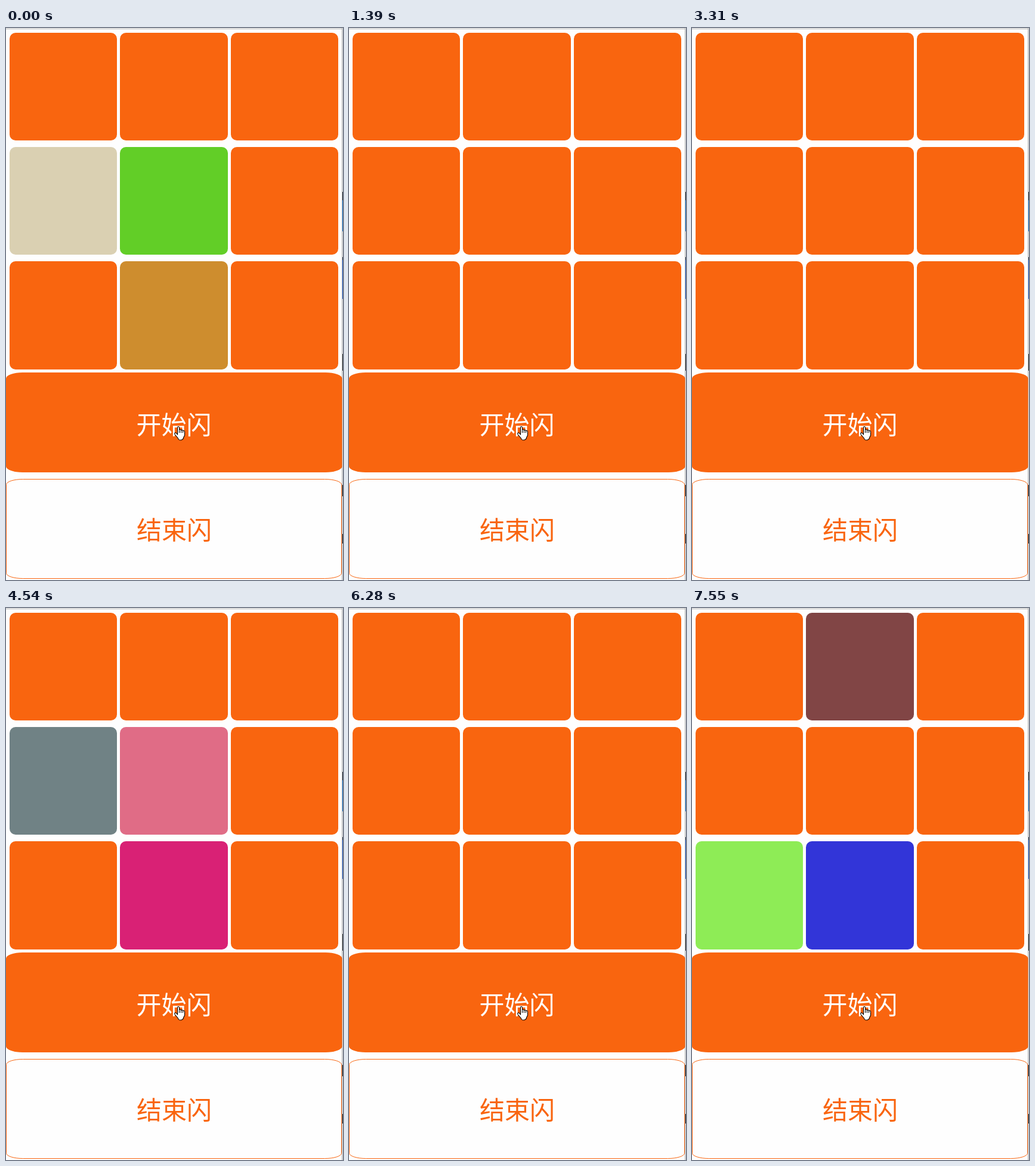
Write an HTML page with a canvas that moves like this. It is 565 px wide and 923 px high and loops after 8 s.

```html
<!DOCTYPE html>
<html lang="zh">
<head>
<meta charset="utf-8">
<style>
  html, body { margin: 0; width: 100%; height: 100%; overflow: hidden; background: #fefefe; }
  canvas { display: block; }
</style>
</head>
<body>
<canvas id="stage" width="565" height="923"></canvas>
<script>
const ctx = document.getElementById('stage').getContext('2d');
const LOOP = 8000;
const ORANGE = '#f9650f';
const PAPER = '#fefefe';

// Column and row spans of the grid: [start, size]
const COLS = [[6, 180], [191, 181], [377, 180]];
const ROWS = [[8, 180], [199, 180], [390, 181]];

// Each flash lights three cells between two moments
const FLASHES = [
  { from: 0,    to: 280,  cells: { 3: '#dad0b2', 4: '#62ce27', 7: '#ce8d2e' } },
  { from: 580,  to: 1390, cells: { 3: '#b9773f', 5: '#5f9fb0', 7: '#a65cc0' } },
  { from: 1510, to: 2320, cells: { 0: '#7fae5a', 5: '#c2586f', 7: '#5b7bc4' } },
  { from: 2470, to: 3310, cells: { 2: '#bf9a63', 3: '#6a5fb5', 7: '#58b08a' } },
  { from: 3590, to: 4270, cells: { 1: '#9c7fc0', 3: '#6fb04e', 7: '#b8685a' } },
  { from: 4540, to: 5320, cells: { 3: '#708285', 4: '#e06c86', 7: '#d92175' } },
  { from: 5440, to: 6280, cells: { 0: '#a8a64f', 4: '#568fba', 7: '#b06a96' } },
  { from: 6430, to: 7270, cells: { 1: '#63a99a', 5: '#b5618a', 7: '#94a35a' } },
  { from: 7550, to: LOOP, cells: { 1: '#814545', 6: '#8eec56', 7: '#3235d8' } }
];

// Slivers of the desktop visible past the window: [top, bottom, colour]
const SLIVERS = [
  [274, 288, '#15202c'], [288, 340, '#0f6fc8'], [383, 388, '#26384c'],
  [388, 453, '#1c58c4'], [545, 573, '#20262a'],
  [764, 783, '#000'], [846, 862, '#000']
];

function rect(x, y, w, h, color) {
  ctx.fillStyle = color;
  ctx.fillRect(x, y, w, h);
}

function roundedPath(x, y, w, h, rx, ry = rx) {
  ctx.beginPath();
  ctx.roundRect(x, y, w, h, { x: rx, y: ry });
}

function label(text, cx, cy, color) {
  ctx.font = '42px "Noto Sans CJK SC", "Noto Sans CJK", sans-serif';
  const m = ctx.measureText(text);
  const x = cx + (m.actualBoundingBoxLeft - m.actualBoundingBoxRight) / 2;
  const y = cy + (m.actualBoundingBoxAscent - m.actualBoundingBoxDescent) / 2;
  ctx.fillStyle = color;
  ctx.fillText(text, x, y);
}

function drawWindow() {
  rect(0, 0, 565, 923, PAPER);
  rect(0, 1, 564, 1, '#b4b4b4');
  rect(563, 0, 1, 923, '#b0b0b0');
  rect(564, 0, 1, 923, '#dde0e4');
  for (const [top, bottom, color] of SLIVERS) rect(564, top, 1, bottom - top, color);
}

function drawGrid(time) {
  const flash = FLASHES.find(f => time >= f.from && time < f.to);
  for (let i = 0; i < 9; i++) {
    const [x, w] = COLS[i % 3];
    const [y, h] = ROWS[Math.floor(i / 3)];
    ctx.fillStyle = flash?.cells[i] ?? ORANGE;
    roundedPath(x, y, w, h, 10);
    ctx.fill();
  }
}

function drawButtons() {
  ctx.fillStyle = ORANGE;
  roundedPath(0, 576, 563.5, 167, 28, 10);
  ctx.fill();
  label('开始闪', 281, 663, '#fff');

  ctx.strokeStyle = ORANGE;
  ctx.lineWidth = 1;
  roundedPath(0.5, 754.5, 562, 166, 28, 9);
  ctx.stroke();
  label('结束闪', 281, 839, ORANGE);
}

function drawHand() {
  ctx.save();
  ctx.translate(282, 666);
  ctx.lineJoin = 'round';
  ctx.lineWidth = 1.1;
  ctx.strokeStyle = '#000';
  ctx.fillStyle = '#fff';
  ctx.stroke(ctx.fill(fingerPath) || fingerPath);
  ctx.beginPath();
  for (const x of [8.5, 11.5, 14.5]) {
    ctx.moveTo(x, 6.5);
    ctx.lineTo(x, 11);
  }
  ctx.stroke();
  ctx.restore();
}

const fingerPath = new Path2D(
  'M5.5 14V2Q5.5 .5 7 .5T8.5 2V6Q11 4.8 11.5 6.5Q14 5.5 14.5 7.5' +
  'Q17.5 6.5 17.5 9.5V15L15.5 19V20Q14 23 10.5 23Q7 23 6.5 20' +
  'L1 13.5Q0 11 2 10.8Q4 11 5.5 14Z'
);

function frame(now) {
  drawWindow();
  drawGrid(now % LOOP);
  drawButtons();
  drawHand();
  requestAnimationFrame(frame);
}

requestAnimationFrame(frame);
</script>
</body>
</html>
```
